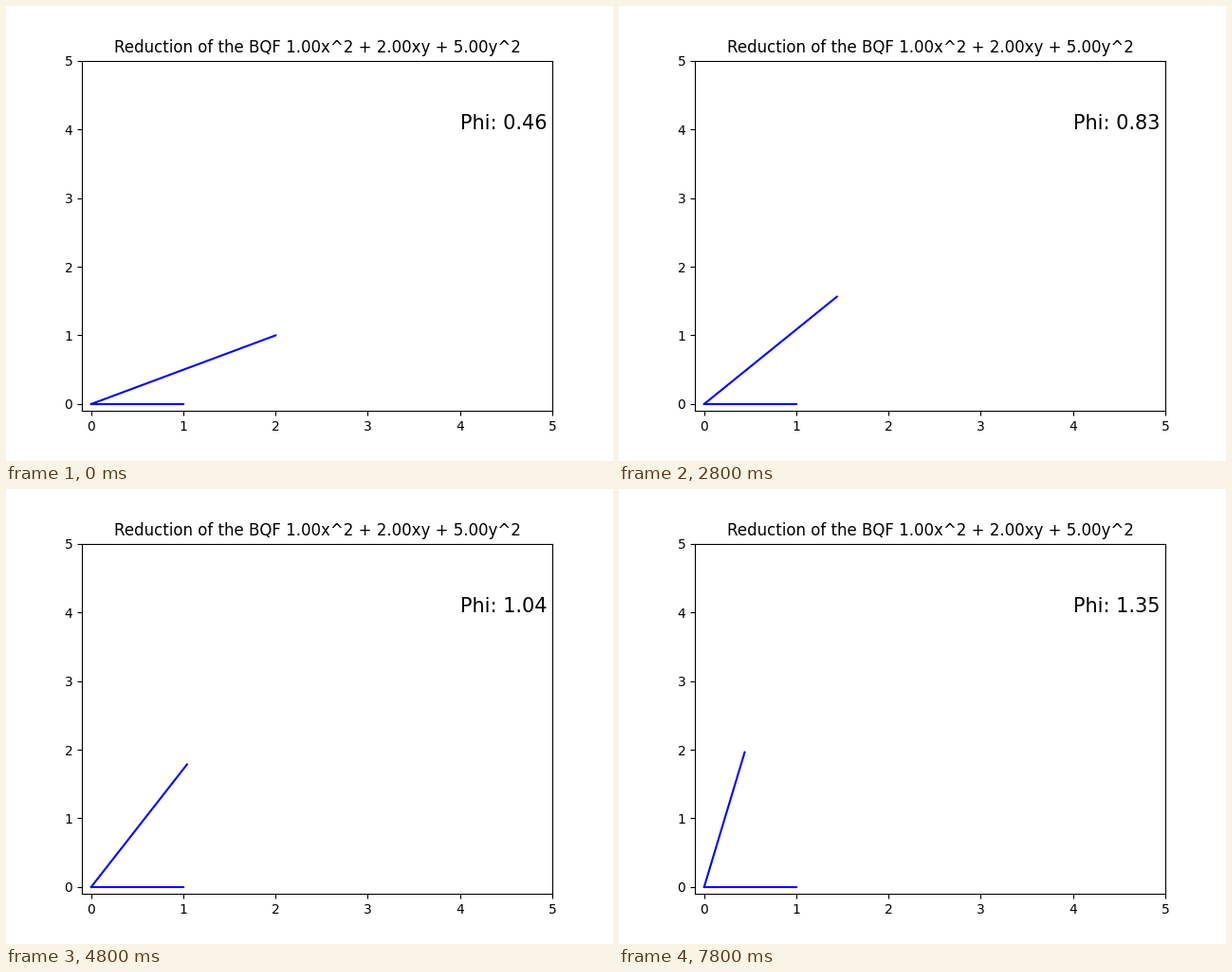
Write a matplotlib script that moves like this. It is 640 px wide and 480 px high and loops after 8 s.

```python
import math

import matplotlib.pyplot as plt
from matplotlib.animation import FuncAnimation

FRAMES = 40
STEP_MS = 200
A, B, C = 1.0, 2.0, 5.0

fig, ax = plt.subplots(figsize=(6.4, 4.8), dpi=100)
ax.set_xlim(-0.1, 5)
ax.set_ylim(-0.1, 5)
ax.set_title(f"Reduction of the BQF {A:.2f}x^2 + {B:.2f}xy + {C:.2f}y^2")

ax.plot([0, 1], [0, 0], color="blue", lw=1.5)
arm, = ax.plot([], [], color="blue", lw=1.5)
label = ax.text(4, 4, "", fontsize=15)


def update(i):
    # the tip slides along an ellipse at constant horizontal speed
    x = 2 - 0.04 * i
    y = math.sqrt(4 - 0.75 * x * x)
    arm.set_data([0, x], [0, y])
    label.set_text(f"Phi: {math.atan2(y, x):.2f}")
    return arm, label


anim = FuncAnimation(fig, update, frames=FRAMES, interval=STEP_MS,
                     repeat=True, repeat_delay=0, blit=False)
plt.show()
```
